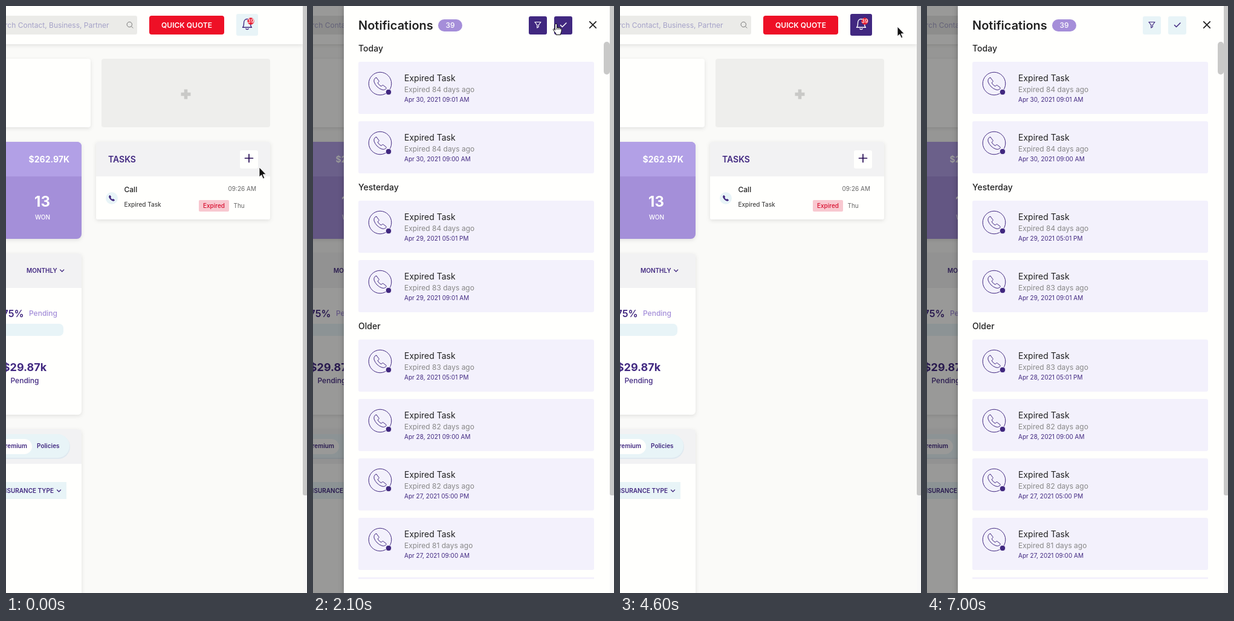
Recreate the animation shown at these times as an HTML page. Size 498x968 px, loop 7.1 s.

```html
<!DOCTYPE html>
<html lang="en">
<head>
<meta charset="utf-8">
<title>Notifications drawer</title>
<style>
  html, body { margin: 0; width: 100%; height: 100%; overflow: hidden; background: #fafaf8; }
  svg { display: block; width: 498px; height: 968px; font-family: Inter, sans-serif; }
  .card { filter: drop-shadow(0 2px 3px #0000001a); }
  .line { fill: none; stroke-linecap: round; stroke-linejoin: round; }
</style>
</head>
<body>
<svg id="stage" viewBox="0 0 498 968"></svg>
<script>
const INK = '#412880', DEEP = '#250a52', PALE = '#e8f4f7', WHITE = '#fffffd', RED = '#ee1026';
const LOOP = 7100;

const text = (x, y, size, weight, fill, str, anchor = 'start') =>
  `<text x="${x}" y="${y}" font-size="${size}" font-weight="${weight}" fill="${fill}" text-anchor="${anchor}">${str}</text>`;
const rect = (x, y, w, h, fill, r = 0, extra = '') =>
  `<rect x="${x}" y="${y}" width="${w}" height="${h}" rx="${r}" fill="${fill}" ${extra}/>`;
const line = (d, color, width, extra = '') =>
  `<path class="line" d="${d}" stroke="${color}" stroke-width="${width}" ${extra}/>`;
const circle = (x, y, r, fill, extra = '') =>
  `<circle cx="${x}" cy="${y}" r="${r}" fill="${fill}" ${extra}/>`;
const card = (...parts) => `<g class="card">${parts.join('')}</g>`;
const chevron = (x, y) => line(`M${x} ${y}l3 3 3-3`, INK, 1.3);

const handset = 'M5 .8L9 6Q9.5 7 8.5 8L7 9.2Q9 13 13 15L14.3 13.5Q15.2 12.7 16.2 13.3L21 17' +
  'Q21.8 18 20.8 19Q18 22 14 20.5Q4.5 17 1 7.5Q0 4 3.2 1Q4.2 .1 5 .8Z';

const header = card(rect(-9, -9, 500, 72, WHITE)) +
  rect(-9, 16, 226, 31, '#ebebe8', 3) +
  text(170.5, 36, 12, 400, '#a5a2c8', 'Search Contact, Business, Partner', 'end') +
  circle(204.3, 30.5, 4.2, 'none', 'stroke="#777" stroke-width="1"') +
  line('M207.5 33.7l2.5 2.5', '#777', 1) +
  rect(237, 16, 124, 31, RED, 4) +
  text(299, 36, 12, 600, '#fff', 'QUICK QUOTE', 'middle') +
  rect(381, 13, 36, 36, PALE, 3, 'id="bellBox"') +
  `<g id="bell" class="line" stroke-width="1.4">
    <path d="M391.5 35.3c2-1.5 2-4 2-7.3 0-4 2.500-6.500 5.500-6.500s5.500 2.500 5.500 6.500c0 3.300 0 5.800 2 7.300z"/>
    <path d="M397 37.500c.5 1.500 3.500 1.500 4 0"/></g>` +
  circle(405, 25, 5.7, '#e81a2e') +
  text(405, 28.3, 9, 500, '#fff', '39', 'middle');

const summary = card(rect(-9, 87, 149, 113, WHITE, 4)) +
  rect(158, 87, 279, 113, '#eeeeec', 4) +
  rect(289.5, 142.700, 16, 5.6, '#c9c9c7') + rect(294.7, 137.500, 5.6, 16, '#c9c9c7') +
  card(rect(-9, 224, 134, 160, '#a48fd9', 8),
       '<path d="M-9 281V224H117q8 0 8 8V281z" fill="#b2a0e6"/>') +
  text(105, 258, 14, 700, '#fff', '$262.97K', 'end') +
  text(60, 331, 24, 700, '#fff', '13', 'middle') +
  text(60.500, 352, 10, 500, '#fff', 'WON', 'middle');

const panel = (y, h) => card(rect(-9, y, 134, h, WHITE, 6),
  `<path d="M-9 ${y + 57}V${y}H119q6 0 6 6V${y + 57}z" fill="#f2f2f3"/>`);

const charts = panel(408, 266) +
  text(34, 440, 10, 600, INK, 'MONTHLY') + chevron(89.7, 435) +
  text(29.5, 513, 16, 600, INK, '75%', 'end') +
  text(38, 511, 12, 500, '#a48fd9', 'Pending') +
  rect(-9, 524, 104, 20, PALE, 7) +
  text(31, 602, 18, 700, INK, '$29.87k', 'middle') +
  text(31, 622, 12, 500, INK, 'Pending', 'middle') +
  panel(698, 300) +
  rect(-30, 707, 136, 40, '#dfe9f0', 20) + rect(-30, 706, 135, 39, PALE, 19.5) +
  rect(-30, 714, 73, 25, WHITE, 12.5) +
  text(35, 729, 10, 600, INK, 'Premium', 'end') +
  text(51, 729, 10, 600, INK, 'Policies') +
  rect(-9, 785, 109, 28, PALE) +
  text(79, 803, 10, 600, INK, 'INSURANCE TYPE', 'end') + chevron(84.5, 798);

const tasks = card(rect(149, 224, 288, 128, WHITE, 3),
    '<path d="M149 281V227q0-3 3-3H434q3 0 3 3V281z" fill="#f2f2f3"/>') +
  text(169, 258, 14, 600, INK, 'TASKS') +
  rect(387, 238, 30, 30, WHITE, 3) +
  line('M395.500 251h13M402 244.500v13', DEEP, 1.700) +
  circle(175, 317, 10, PALE) +
  `<path d="${handset}" fill="${INK}" transform="translate(169.700 311.700) scale(.48)"/>` +
  text(195.500, 307, 12, 500, '#222', 'Call') +
  text(195.500, 331, 10, 500, '#444', 'Expired Task') +
  text(414, 305, 10, 400, '#666', '09:26 AM', 'end') +
  rect(319, 320, 50, 19, '#f8c8d0', 2) +
  text(344, 333, 10, 500, '#d81030', 'Expired', 'middle') +
  text(376.500, 333, 10, 400, '#666', 'Thu');

const notice = ([y, age, date]) => rect(75, y, 390, 86, '#f3f1fc', 3) +
  circle(111, y + 36, 18.8, 'none', `stroke="${INK}" stroke-width="1"`) +
  line(handset, INK, 1, `transform="translate(100 ${y + 25.500})"`) +
  circle(125, y + 50, 4.8, INK, 'stroke="#f3f1fc" stroke-width="1"') +
  text(151, y + 32, 14, 400, '#222', 'Expired Task') +
  text(151, y + 50, 12, 400, '#888', `Expired ${age} days ago`) +
  text(151, y + 66, 10, 400, INK, `Apr ${date}`);

const notices = [
  [92, 84, '30, 2021 09:01 AM'], [190, 84, '30, 2021 09:00 AM'],
  [321, 84, '29, 2021 05:01 PM'], [419, 83, '29, 2021 09:01 AM'],
  [550, 83, '28, 2021 05:01 PM'], [648, 82, '28, 2021 09:00 AM'],
  [746, 82, '27, 2021 05:00 PM'], [844, 81, '27, 2021 09:00 AM'],
];

const drawer = rect(0, 0, 491, 968, '#000', 0, 'id="shade"') +
  `<g id="drawer">` +
  rect(51, 0, 440, 968, WHITE, 0, 'style="filter:drop-shadow(0 0 5px #0004)"') +
  text(75, 39, 20, 600, '#222', 'Notifications') +
  rect(207, 22, 40, 20, '#a58ed9', 10) +
  text(227, 36, 12, 500, '#fff', '39', 'middle') +
  rect(357, 17, 30, 30, PALE, 3, 'id="filterBox"') +
  line('M367 26.500h10l-3.800 4.800v3.200l-2.400 1.500v-4.700z', INK, 1.200, 'id="filterIcon"') +
  rect(399, 17, 30, 30, PALE, 3, 'id="checkBox"') +
  line('M409.500 31.500l3 3 6.500-6.500', INK, 1.500, 'id="checkIcon"') +
  rect(447, 15, 32, 32, RED, 2, 'id="closeBox"') +
  line('M457.800 25.800l10.400 10.400M468.200 25.800l-10.400 10.400', '#222', 1.800, 'id="closeIcon"') +
  text(75, 75, 14, 500, '#222', 'Today') +
  text(75, 304, 14, 500, '#222', 'Yesterday') +
  text(75, 533, 14, 500, '#222', 'Older') +
  notices.map(notice).join('') +
  rect(75, 942, 390, 3, '#f3f1fc') +
  rect(481, 59, 10, 54, '#c9c9c8', 5) + '</g>';

const scrollbar = rect(491, 0, 7, 968, '#f8f8f8') + rect(491, -9, 8, 816, '#c8c8c8', 3);

const cursor = `<g id="cursor">
  <path id="arrow" d="M0 0v16l3.700-3.300 2.600 6 2.500-1-2.600-5.900h5.100z" fill="#111" stroke="#fff" stroke-width=".9"/>
  <g id="hand" stroke="#111" stroke-width="1" stroke-linejoin="round">
    <path d="M-1.500 9V.8q0-1.600 1.500-1.600t1.500 1.600V5.500q4-.4 7 1.500 .7 .5 .7 3 0 3-1.500 5.500v2H0v-2q-3.500-4-4.800-7 .8-1.500 2.200-.3L-1.500 10z" fill="#fff"/>
    <path d="M1.500 5.500v3.500M4.200 6v3M6.800 6.500v2.500" fill="none"/></g></g>`;

const stage = document.getElementById('stage');
stage.innerHTML = header + summary + charts + tasks + drawer + scrollbar + cursor;
const ui = {};
stage.querySelectorAll('[id]').forEach(el => ui[el.id] = el);

const clamp = v => Math.min(1, Math.max(0, v));
const smooth = v => v * v * (3 - 2 * v);
const within = (t, from, to) => t >= from && t < to;

// time, x, y of the pointer tip
const path = [
  [0, 419, 266], [500, 414, 163], [600, 414, 163], [1100, 398, 30], [2000, 398, 30],
  [2100, 402, 30], [2800, 402, 30], [3000, 435, 32], [3100, 435, 32], [3500, 461, 34],
  [4500, 461, 34], [4600, 459, 34], [4800, 404, 35], [LOOP, 404, 35],
];

function pointer(t) {
  const i = path.findIndex(p => p[0] > t);
  const [t0, x0, y0] = path[i - 1], [t1, x1, y1] = path[i];
  const k = smooth((t - t0) / (t1 - t0));
  return [x0 + (x1 - x0) * k, y0 + (y1 - y0) * k];
}

function openness(t) {
  if (t < 4000) return smooth(clamp((t - 1800) / 225));
  if (t < 5000) return 1 - clamp((t - 4050) / 200);
  return smooth(clamp((t - 5400) / 200));
}

function setButton(name, active) {
  ui[name + 'Box'].setAttribute('fill', active ? INK : PALE);
  ui[name + 'Icon'].setAttribute('stroke', active ? '#fff' : INK);
}

function draw(now) {
  const t = Math.floor(now % LOOP / 100) * 100;
  const open = openness(t), [x, y] = pointer(t);

  const pressed = within(t, 1400, 1900) || within(t, 5000, 5500);
  const focused = within(t, 1000, 1400) || within(t, 4100, 5000);
  ui.bellBox.setAttribute('fill', pressed ? DEEP : focused ? INK : PALE);
  ui.bell.setAttribute('stroke', pressed || focused ? '#fff' : INK);

  ui.shade.setAttribute('opacity', open * .4);
  ui.drawer.setAttribute('opacity', open);

  const onCheck = within(t, 2100, 3000) || within(t, 5600, 6300);
  const onClose = within(t, 3300, 4300);
  setButton('filter', within(t, 1900, 3700) || within(t, 5400, 7000));
  setButton('check', onCheck);
  ui.closeBox.setAttribute('opacity', onClose ? 1 : 0);
  ui.closeIcon.setAttribute('stroke', onClose ? '#fff' : '#222');

  const hand = onCheck || onClose;
  ui.cursor.setAttribute('transform', `translate(${x} ${y})`);
  ui.cursor.setAttribute('visibility', t < 6200 ? 'visible' : 'hidden');
  ui.arrow.setAttribute('display', hand ? 'none' : 'inline');
  ui.hand.setAttribute('display', hand ? 'inline' : 'none');
}

const start = performance.now();
function tick() {
  draw(performance.now() - start);
  requestAnimationFrame(tick);
}
tick();
</script>
</body>
</html>
```
